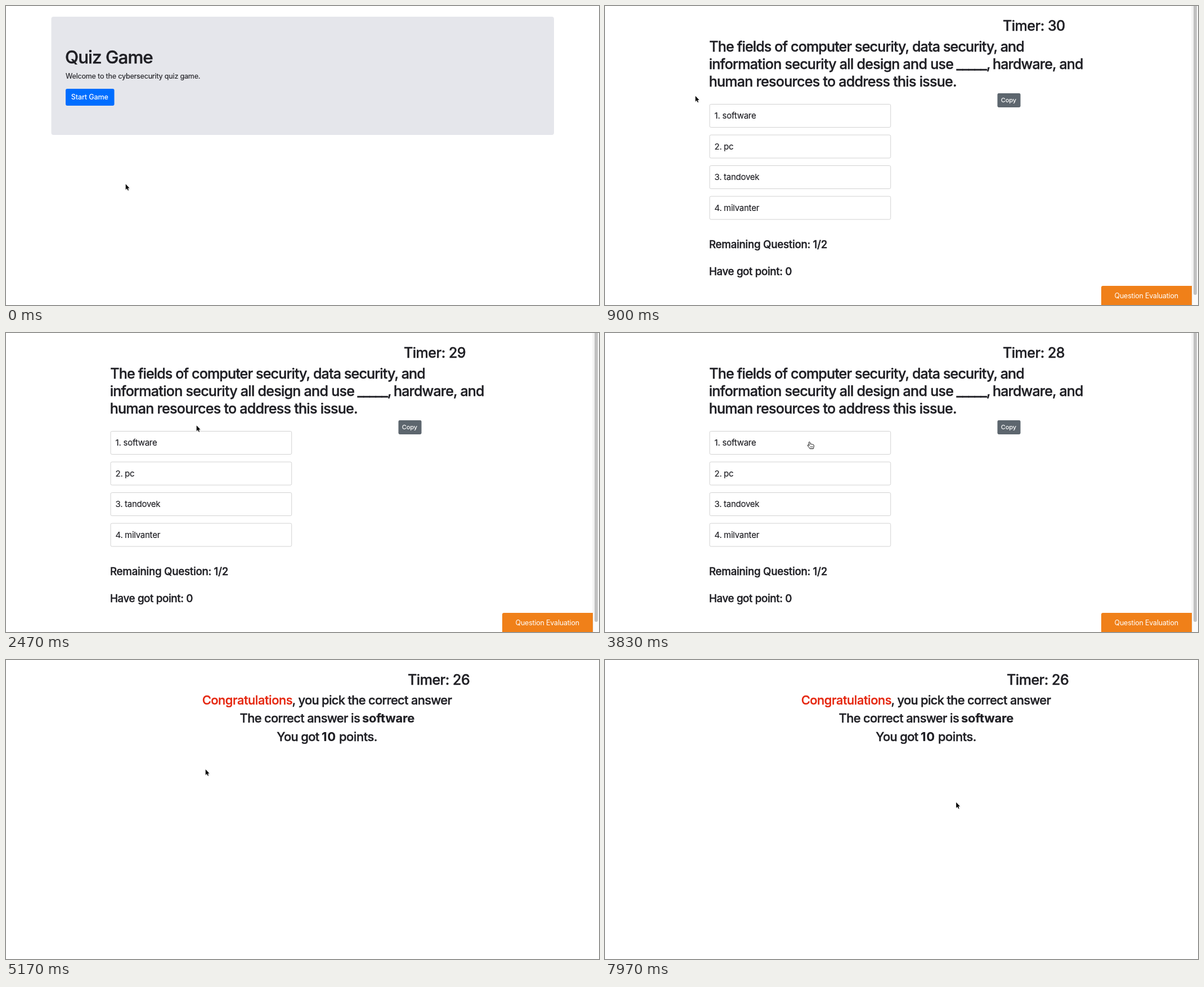
Animation, 1054 px wide and 531 px high, one loop 8 s. Source, as an HTML page:

```html
<!DOCTYPE html>
<html lang="en">
<head>
<meta charset="utf-8">
<title>Quiz Game</title>
<style>
  html, body { margin: 0; width: 100%; height: 100%; overflow: hidden; background: #fff; }
  svg { display: block; width: 1054px; height: 531px; }
  text {
    font-family: Inter, "Open Sans", sans-serif;
    font-optical-sizing: none;
    fill: #1f1f24;
    stroke: #1f1f24;
    stroke-width: .15px;
    white-space: pre;
  }
  .medium { font-weight: 500; stroke-width: .4px; }
  .bold { font-weight: 700; stroke-width: .2px; }
  .white { fill: #fff; stroke: none; }
  .red { fill: #e5260f; stroke: #e5260f; }
</style>
</head>
<body>
<svg id="stage" viewBox="0 0 1054 531" xmlns="http://www.w3.org/2000/svg">
  <rect width="1054" height="531" fill="#fff"/>
  <g id="welcome"></g>
  <g id="quiz"></g>
  <g id="result"></g>
  <g id="arrow">
    <path d="M.4 .6V12L3 9.6 4.6 13 6.6 12.2 5.1 8.7H8.2Z" fill="#000" opacity=".15"/>
    <path d="M.2 .3V10.3L2.5 8.1 4 11.6 5.5 10.9 4.1 7.4H7Z"
      fill="#000" stroke="#fff" stroke-width="1.1" paint-order="stroke"/>
  </g>
  <g id="hand">
    <path d="M-1.1 1C-1.1-.7 1-.7 1.3 .9L2 4C2.6 3 4 3.2 4.2 4.2 4.9 3.4 6 3.8 6.2 4.8
      7 4.2 8 4.7 8 5.8V8C8 9.4 7.2 9.9 7 11.8H.9C.5 10.4-.9 9.5-1.7 8.2L-3.2 6.2
      C-3.6 5.2-2.2 4.5-1.3 5.4L-.3 6.5Z"
      fill="#fff" stroke="#000" stroke-width=".95" stroke-linejoin="round"/>
    <path d="M2.2 7.4V9.8M4 7.4V9.8M5.8 7.4V9.8" stroke="#000" stroke-width=".7"/>
  </g>
</svg>
<script>
const LOOP = 8000, QUIZ_AT = 885, RESULT_AT = 5090, TICK = 1005;
const byId = id => document.getElementById(id);

function add(parent, tag, attrs, content = "") {
  const node = document.createElementNS("http://www.w3.org/2000/svg", tag);
  for (const key in attrs) node.setAttribute(key, attrs[key]);
  node.textContent = content;
  return parent.appendChild(node);
}

const box = (parent, x, y, width, height, fill, extra = {}) =>
  add(parent, "rect", { x, y, width, height, fill, ...extra });

const label = (parent, x, y, size, spacing, content, style = "") =>
  add(parent, "text", { x, y, "font-size": size, "letter-spacing": spacing, class: style }, content);

// Welcome screen
const welcome = byId("welcome");
box(welcome, 80.5, 19, 893.5, 210, "#e5e6eb", { rx: 4 });
label(welcome, 105, 101.8, 31.3, -0.9, "Quiz Game", "medium");
label(welcome, 106, 129, 12.5, -0.16, "Welcome to the cybersecurity quiz game.");
const startButton = box(welcome, 106, 147, 86.5, 30, "#006eff", { rx: 3 });
label(welcome, 115.7, 166.2, 12.5, -0.1, "Start Game", "medium white");

// Question screen
const quiz = byId("quiz");
const quizTimer = label(quiz, 707, 44, 25, -0.5, "", "medium");
label(quiz, 185.3, 81.2, 25, -0.83, "The fields of computer security, data security, and", "medium");
label(quiz, 184.7, 112.1, 25, -0.71, "information security all design and use", "medium");
label(quiz, 624.5, 112.1, 25, -0.8, "_____", "medium");
label(quiz, 678, 112.1, 25, 0, ",", "medium");
label(quiz, 689, 112.1, 25, -0.82, "hardware, and", "medium");
label(quiz, 184.7, 143, 25, -0.71, "human resources to address this issue.", "medium");
box(quiz, 697.5, 155, 41, 25, "#5d666e", { rx: 2.4 });
label(quiz, 703.8, 171.4, 11, -0.1, "Copy", "medium white");

["software", "pc", "tandovek", "milvanter"].forEach((answer, i) => {
  const y = 174.5 + i * 54.5;
  box(quiz, 186, y, 321.7, 41, "#fff", { rx: 2.4, stroke: "#d2d2d2" });
  label(quiz, 194.5, y + 25.9, 15, -0.22, `${i + 1}.`);
  label(quiz, i ? 211 : 208.6, y + 25.9, 15, -0.25, answer);
});

label(quiz, 185, 430.3, 18.7, -0.24, "Remaining Question: 1/2", "medium");
label(quiz, 185, 478.3, 18.7, -0.34, "Have got point: 0", "medium");
add(quiz, "path", { d: "M882 531V500Q882 497 885 497H1043V531Z", fill: "#f08019" });
label(quiz, 905.6, 518.6, 12.5, -0.21, "Question Evaluation", "white");
box(quiz, 1043, 0, 11, 531, "#fafafa");
box(quiz, 1043, 0, 1, 531, "#e6e6e6");
box(quiz, 1046, -8, 6, 521, "#c1c1c1", { rx: 3 });

// Result screen
const result = byId("result");
label(result, 714, 44, 25, -0.48, "Timer: 26", "medium");
label(result, 348.7, 78.7, 21.8, -0.36, "Congratulations", "medium red");
label(result, 508.5, 78.7, 21.8, -0.64, ", you pick the correct answer", "medium");
label(result, 415.5, 111.2, 21.8, -0.6, "The correct answer is", "medium");
label(result, 633, 111.2, 21.8, -0.15, "software", "bold");
label(result, 481.3, 143.6, 21.8, -0.6, "You got", "medium");
label(result, 560.9, 143.6, 22, 0.9, "10", "bold");
label(result, 592, 143.6, 21.8, -0.4, "points.", "medium");

// Pointer stops: time, x, y; each leg is eased
const stops = [
  [0, 212.5, 316], [830, 160.5, 159.5], [1740, 160.5, 159.5],
  [2440, 338.5, 164], [2580, 338.5, 164], [3500, 363.3, 193.7],
  [4270, 363.3, 193.7], [4800, 354.5, 194], [6790, 354.5, 194],
  [7600, 624, 252.5], [LOOP, 624, 252.5]
];
const ease = u => u * u * (3 - 2 * u);

function pointerAt(t) {
  const next = Math.max(1, stops.findIndex(stop => stop[0] > t));
  const [t0, x0, y0] = stops[next - 1], [t1, x1, y1] = stops[next];
  const u = ease((t - t0) / (t1 - t0));
  if (next > 1) return [x0 + (x1 - x0) * u, y0 + (y1 - y0) * u];
  // The opening move swings right and over the button before settling on it
  const v = 1 - u;
  const bend = (a, b, c, d) => v * v * v * a + 3 * v * v * u * b + 3 * v * u * u * c + u * u * u * d;
  return [bend(x0, 310, 295, x1), bend(y0, 215, -30, y1)];
}

const show = (node, on) => node.setAttribute("display", on ? "inline" : "none");

function render(t) {
  const [x, y] = pointerAt(t);
  const inQuiz = t >= QUIZ_AT && t < RESULT_AT;
  show(welcome, t < QUIZ_AT);
  show(quiz, inQuiz);
  show(result, t >= RESULT_AT);

  const overStart = x > 106 && x < 192 && y > 147 && y < 177;
  startButton.setAttribute("fill", overStart ? "#005bd6" : "#006eff");
  quizTimer.textContent = `Timer: ${30 - Math.max(0, Math.floor((t - QUIZ_AT) / TICK))}`;

  const overAnswer = inQuiz && x > 186 && x < 508 && y > 174.5;
  const arrow = byId("arrow"), hand = byId("hand");
  show(arrow, !overAnswer);
  show(hand, overAnswer);
  (overAnswer ? hand : arrow).setAttribute("transform", `translate(${x} ${y})`);
}

function frame() {
  render(performance.now() % LOOP);
  requestAnimationFrame(frame);
}
frame();
</script>
</body>
</html>
```
